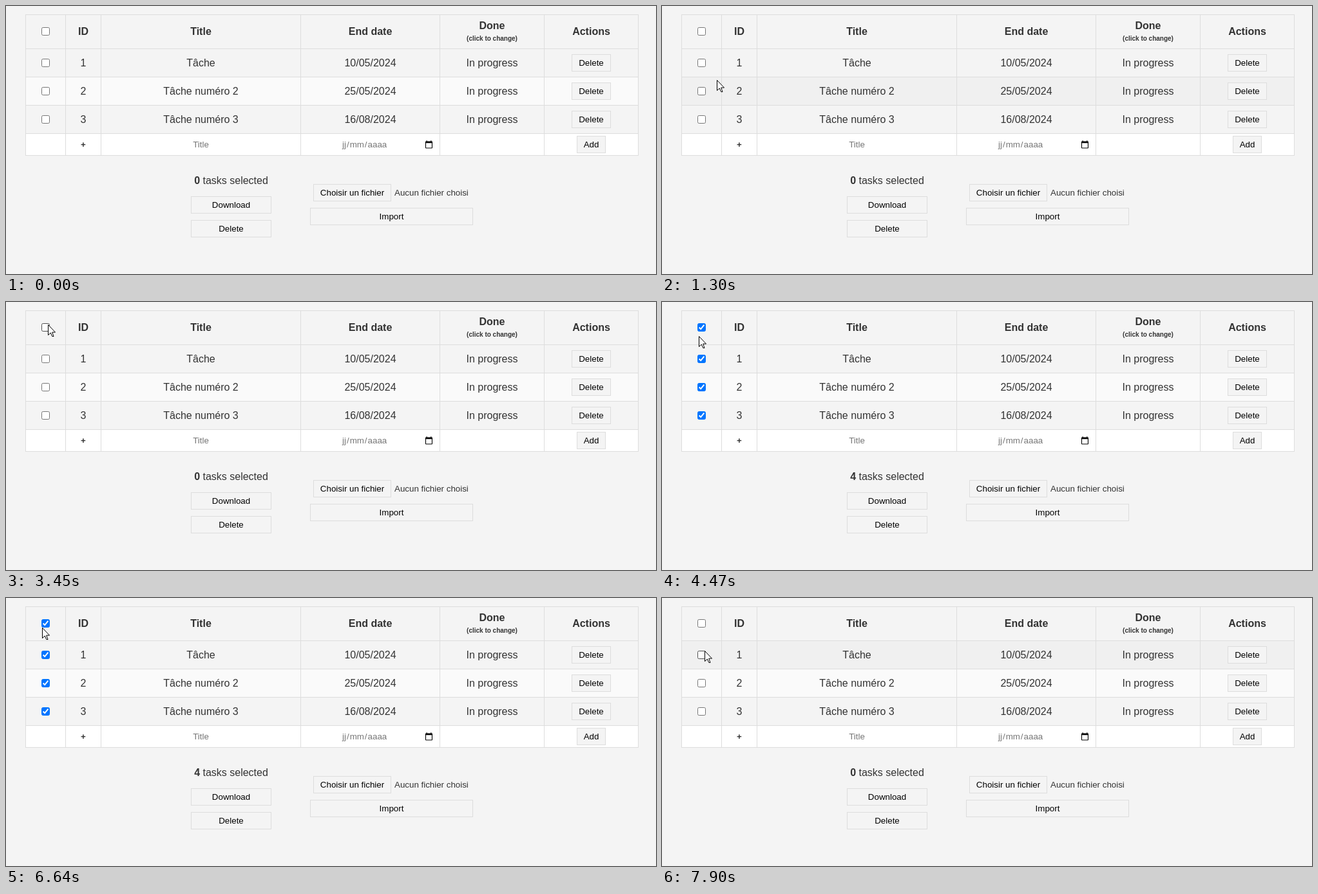
Recreate the animation shown at these times as an HTML page. Size 1009 px wide and 417 px high, loop 8 s.

```html
<!DOCTYPE html>
<html lang="en">
<head>
<meta charset="utf-8">
<title>Task table</title>
<style>
  html, body { margin: 0; width: 100%; height: 100%; overflow: hidden; background: #f4f4f4; }
  svg { display: block; font: 16px Arial, "Liberation Sans", sans-serif; }
  text { fill: #333; white-space: pre; }
  .mid { text-anchor: middle; }
  .bold { font-weight: bold; }
  .tiny { font-size: 10px; font-weight: bold; }
  .ui { font-size: 13.333px; }
  .black { fill: #000; }
  .hint { fill: #757575; }
</style>
</head>
<body>
<svg id="stage" width="1009" height="417" viewBox="0 0 1009 417"></svg>
<script>
const LOOP = 8000, ENTER_AT = 160, CHECK_AT = 3700, UNCHECK_AT = 7120;
const LEFT = 30, TOP = 13, WIDTH = 952, HEAD = 53, ROW = 44, LAST = 34;
const COLS = [LEFT, 92, 147, 457, 673, 835, LEFT + WIDTH - 1];
const HEADINGS = ["ID", "Title", "End date", "Done", "Actions"];
const TASKS = [
  ["1", "Tâche", "10/05/2024", "In progress"],
  ["2", "Tâche numéro 2", "25/05/2024", "In progress"],
  ["3", "Tâche numéro 3", "16/08/2024", "In progress"]
];

// Turning points of the pointer: time, x, y
const PATH = [
  [ENTER_AT, 876, 411], [960, 72, 127], [1300, 85, 115], [1830, 67, 88],
  [2560, 52, 51], [3150, 61, 24], [3450, 65, 35], [4280, 65, 36],
  [4720, 47, 75], [5390, 63, 129], [6030, 58, 76], [6640, 56, 46],
  [UNCHECK_AT, 60, 36], [7500, 46, 45], [7900, 66, 82], [LOOP, 66, 82]
];

const rowTop = r => TOP + HEAD + r * ROW;
const rowFill = r => r % 2 ? "#fafafa" : "#f4f4f4";
const center = i => (COLS[i] + COLS[i + 1] + 1) / 2;
const addTop = rowTop(TASKS.length), bottom = addTop + LAST;

const text = (x, y, s, cls = "mid") => `<text x="${x}" y="${y}" class="${cls}">${s}</text>`;
const rect = (x, y, w, h, fill, extra = "") =>
  `<rect x="${x}" y="${y}" width="${w}" height="${h}" fill="${fill}" ${extra}/>`;
const button = (x, y, w, label) =>
  rect(x + .5, y + .5, w - 1, 26, "#f4f4f4", 'stroke="#ddd"') +
  text(x + w / 2, y + 18, label, "mid ui black");
const checkbox = y =>
  `<g class="check" transform="translate(55 ${y})">` + rect(.5, .5, 12, 12, "#fff", 'rx="2"') +
  '<path d="M2.6 6.5L5.2 9.1L10.4 2.6" fill="none" stroke="#fff" stroke-width="2"/></g>';

function grid() {
  const lines = [TOP, ...TASKS.map((_, r) => rowTop(r)), addTop, bottom];
  const d = COLS.map(x => `M${x + .5} ${TOP}V${bottom + 1}`).join("") +
    lines.map(y => `M${LEFT} ${y + .5}h${WIDTH}`).join("");
  return `<path d="${d}" stroke="#ddd"/>`;
}

function table() {
  const fills = TASKS.map((_, r) => rect(LEFT, rowTop(r), WIDTH, ROW, rowFill(r), 'class="row"'));
  const heads = HEADINGS.map((h, i) => text(center(i + 1), h === "Done" ? 36 : 45, h, "mid bold"));
  const rows = TASKS.map((task, r) => {
    const y = rowTop(r);
    return task.map((cell, i) => text(center(i + 1), y + 28, cell)).join("") +
      button(878, y + 9, 61, "Delete") + checkbox(y + 16);
  });
  return rect(LEFT, addTop, WIDTH, LAST, "#fff") + fills.join("") + grid() +
    checkbox(TOP + 20) + heads.join("") +
    text(center(4), 54, "(click to change)", "mid tiny") + rows.join("");
}

function addRow() {
  const y = addTop + 22;
  const date = ["jj", "/", "mm", "/", "aaaa"].map(s => `<tspan dx="1">${s}</tspan>`).join("");
  return text(center(1), y, "+", "mid ui bold") + text(center(2), y, "Title", "mid ui hint") +
    text(521, y, date, "ui hint") + button(886, addTop + 4, 45, "Add") +
    '<path transform="translate(649.8 208.8) scale(.555)" fill-rule="evenodd" ' +
    'd="M20 3H19V1H17V3H7V1H5V3H4Q2 3 2 5V21Q2 23 4 23H20Q22 23 22 21V5Q22 3 20 3ZM20 21H4V8H20Z"/>';
}

const controls = () =>
  text(349.5, 277, '<tspan id="count" class="bold">0</tspan> tasks selected') +
  button(287, 296, 125, "Download") + button(287, 333, 125, "Delete") +
  button(477, 277, 121, "Choisir un fichier") +
  text(603, 295, "Aucun fichier choisi", "ui") +
  button(472, 314, 253, "Import");

const stage = document.getElementById("stage");
stage.innerHTML = table() + addRow() + controls() +
  '<path id="pointer" d="M.5 .5V16.5L4.3 13L6.8 18.5H9L6.7 12.1H11.5Z" fill="#fff" stroke="#000"/>';
const rows = stage.querySelectorAll(".row");
const checks = stage.querySelectorAll(".check");
const count = document.getElementById("count");
const pointer = document.getElementById("pointer");

function position(t) {
  const i = Math.max(1, PATH.findIndex(p => p[0] >= t));
  const [t0, x0, y0] = PATH[i - 1], [t1, x1, y1] = PATH[i];
  const k = Math.max(0, (t - t0) / (t1 - t0));
  return [Math.round(x0 + (x1 - x0) * k), Math.round(y0 + (y1 - y0) * k)];
}

function draw(now) {
  const t = now % LOOP;
  const shown = t >= ENTER_AT;
  const [x, y] = position(t);
  const checked = t >= CHECK_AT && t < UNCHECK_AT;

  pointer.setAttribute("visibility", shown ? "visible" : "hidden");
  pointer.setAttribute("transform", `translate(${x} ${y})`);
  rows.forEach((row, r) => {
    const over = shown && y >= rowTop(r) && y < rowTop(r + 1);
    row.setAttribute("fill", over ? "#f0f0f0" : rowFill(r));
  });
  checks.forEach((check, i) => {
    const top = i ? rowTop(i - 1) + 16 : TOP + 20;
    const over = shown && x >= 55 && x < 68 && y >= top && y < top + 13;
    const blue = over ? "#005cc8" : "#0075ff";
    const [box, tick] = check.children;
    box.setAttribute("fill", checked ? blue : "#fff");
    box.setAttribute("stroke", checked ? blue : over ? "#4f4f4f" : "#767676");
    tick.setAttribute("visibility", checked ? "visible" : "hidden");
  });
  count.textContent = checked ? checks.length : 0;
  requestAnimationFrame(draw);
}
draw(0);
</script>
</body>
</html>
```
